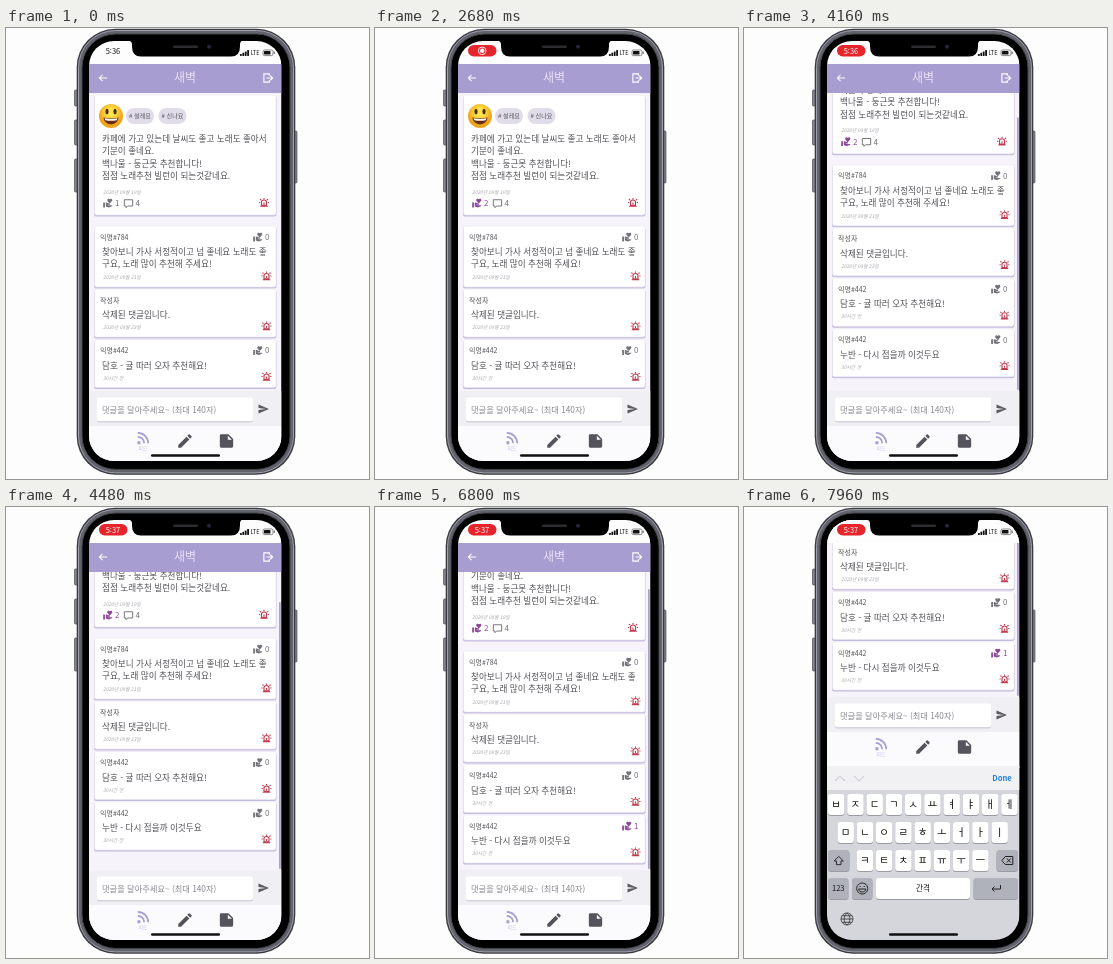
Recreate the animation shown at these times as an HTML page. Size 363 by 451 pixels, loop 8 s.

```html
<!DOCTYPE html>
<html lang="ko">
<head>
<meta charset="utf-8">
<title>Comment screen</title>
<style>
  html, body { margin: 0; width: 100%; height: 100%; overflow: hidden; background: #fdfdfd; }
  svg { display: block; width: 363px; height: 451px; }
  text { font-family: "Noto Sans CJK KR", "Noto Sans CJK", "Noto Sans", sans-serif; }
</style>
</head>
<body>
<svg id="stage" viewBox="0 0 363 451"></svg>
<script>
const INK = '#525157', PALE = '#a5a3aa', MUTED = '#737179', LIKED = '#8c479a', RED = '#bd3c50',
  VIOLET = '#a79dd0', LILAC = '#e9e0f6', SHADOW = '#c5bcdd';

const ICONS = {
  care: 'M1 11h4v11H1zM16 3.25C16.65 2.49 17.66 2 18.7 2 20.55 2 22 3.45 22 5.3c0 2.27-2.91 4.9-6 7.7-3.09-2.81-6-5.44-6-7.7C10 3.45 11.45 2 13.3 2c1.04 0 2.05.49 2.7 1.25zM20 17h-7l-2.09-.73.33-.94L13 16h2.82c.65 0 1.18-.53 1.18-1.18 0-.49-.31-.93-.77-1.11L8.97 11H7v9.02L14 22l8.01-3c-.01-1.1-.9-2-2.01-2z',
  siren: 'M3 21h18M6 19v-8a6 5 0 0 1 12 0v8zM12 12v5M12 1v3M2 4l3 2M22 4l-3 2M0 12h3M21 12h3',
  bubble: 'M2 3h20v15H10l-4 4v-4H2z',
  back: 'M21 12H4M11 5l-7 7 7 7',
  exit: 'M15 7V3H3v18h12v-4M9 12h13M17 7l5 5-5 5',
  send: 'M2 21 23 12 2 3v7l15 2-15 2z',
  rss: 'M3 3a18 18 0 0 1 18 18M3 10a11 11 0 0 1 11 11M4 19h2v2H4z',
  pencil: 'M3 17.25V21h3.75L17.81 9.94l-3.75-3.75zM20.71 7.04a1 1 0 0 0 0-1.41l-2.34-2.34a1 1 0 0 0-1.41 0l-1.83 1.83 3.75 3.75z',
  note: 'M4 2h11l7 7v11a2 2 0 0 1-2 2H4a2 2 0 0 1-2-2V4a2 2 0 0 1 2-2zM14 4v6h6z',
  shift: 'M12 3 2 13h5v8h10v-8h5z',
  erase: 'M8 4h15v16H8l-7-8zM11 8l8 8M19 8l-8 8',
  enter: 'M21 5v8H4M9 8l-5 5 5 5',
  globe: 'M12 1a11 11 0 1 0 .01 0M12 1c-7 6-7 16 0 22M12 1c7 6 7 16 0 22M1 12h22M3 6h18M3 18h18',
  smile: 'M12 1a11 11 0 1 0 .01 0M5 13h14c0 8-14 8-14 0M8 7v2M16 7v2'
};

const rect = (x, y, w, h, fill, r = 0, more = '') =>
  `<rect x="${x}" y="${y}" width="${w}" height="${h}" rx="${r}" fill="${fill}" ${more}/>`;

// y is the vertical middle of the line
const text = (x, y, str, size, fill = INK, more = '') =>
  `<text x="${x}" y="${y + size * 0.36}" font-size="${size}" fill="${fill}" ${more}>${str}</text>`;

const mid = 'text-anchor="middle"';

// Icons are centred on x, y; a line width turns them into outlines
const icon = (name, x, y, size, color, line = 0) =>
  `<path d="${ICONS[name]}" transform="translate(${x - size / 2} ${y - size / 2}) scale(${size / 24})" ` +
  (line ? `fill="none" stroke="${color}" stroke-width="${line}"` : `fill="${color}" fill-rule="evenodd"`) + '/>';

const siren = (x, y) => icon('siren', x, y, 10, RED, 2.7);

const likes = (id, x, y, numX) =>
  `<g id="${id}" fill="${MUTED}">${icon('care', x, y, 10.5, 'currentFill').replace('fill="currentFill"', '')}` +
  text(numX, y, '0', 8, MUTED) + '</g>';

const card = (y, h) =>
  rect(88, y + 1.5, 182.5, h, SHADOW, 2) + rect(88.5, y, 181.5, h, '#fff', 2, 'stroke="#e8e4f1" stroke-width=".6"');

const date = (y, str) => text(97, y, str, 4.85, PALE, 'font-style="italic"');

function comment(y, h, author, lines, written, id) {
  const end = y + h;
  return card(y, h) +
    text(94, y + 11, author, 7) +
    lines.map((line, i) => text(96, y + 26 + i * 12.4, line, 8.6)).join('') +
    date(end - 9.5, written) +
    siren(260.5, end - 11) +
    (id ? likes(id, 252, y + 11, 259) : '');
}

function post() {
  const lines = ['카페에 가고 있는데 날씨도 좋고 노래도 좋아서', '기분이 좋네요.',
    '백나울 - 둥근못 추천합니다!', '점점 노래추천 빌런이 되는것같네요.'];
  const chip = (x, label) => rect(x, 80, 28, 16, '#e0dcea', 8) + text(x + 14, 88, label, 6.1, INK, mid);
  const eye = x => `<ellipse cx="${x}" cy="83.5" rx="1.6" ry="2.7" fill="#4a2b0c"/>`;
  return card(67, 120) +
    '<circle cx="105" cy="88" r="12" fill="url(#sun)"/>' + eye(101) + eye(109) +
    '<path d="M97.5 89.5q7.5 2 15 0c-.5 9-14.5 9-15 0z" fill="#6b2a12"/><path d="M98.5 90.2q6.5 1.5 13 0l-.8 2q-5.7 1-11.4 0z" fill="#fff"/>' +
    chip(120, '# 설레요') + chip(152.5, '# 신나요') +
    lines.map((line, i) => text(96, 111 + i * 12.3, line, 8.6)).join('') +
    date(164, '2020년 09월 19일') +
    likes('postLikes', 102, 175, 109) +
    icon('bubble', 122.5, 175.5, 10, MUTED, 2.3) + text(129.5, 175, '4', 8, MUTED) +
    siren(258, 174.5);
}

function page() {
  return rect(83, 36, 192.5, 398, '#f6f4fa') +
    `<g clip-path="url(#view)"><g id="list">${post()}` +
    comment(198, 61, '익명#784', ['찾아보니 가사 서정적이고 넘 좋네요 노래도 좋', '구요, 노래 많이 추천해 주세요!'], '2020년 09월 21일', 'likesA') +
    comment(261, 48, '작성자', ['삭제된 댓글입니다.'], '2020년 09월 23일') +
    comment(311.5, 48, '익명#442', ['담호 - 귤 따러 오자 추천해요!'], '30시간 전', 'likesB') +
    comment(362, 48, '익명#442', ['누반 - 다시 접을까 이것두요'], '30시간 전', 'likesC') +
    `</g>${rect(273, 82, 1.8, 270, '#aaa3c4', 0.9, 'id="bar"')}</g>` +
    rect(83, 363, 192.5, 35, '#f0eff3') + rect(91, 371, 156, 23.5, '#d6d2e0', 2) + rect(91, 369.5, 156, 23.5, '#fff', 2) +
    text(96, 382, '댓글을 달아주세요~ (최대 140자)', 8.25, '#89878f') +
    icon('send', 257.5, 381, 12, '#5c5a63') +
    rect(83, 398, 192.5, 36, '#fbfafd') +
    icon('rss', 137, 410, 14, VIOLET, 3) + text(137, 420.5, '피드', 4.8, '#c9bbe4', mid) +
    icon('pencil', 179, 413, 18, '#55535c') + icon('note', 220.5, 413, 16, '#55535c') +
    rect(83, 36, 192.5, 29, VIOLET) +
    icon('back', 97, 50, 11, '#fff', 2.2) + text(179, 50, '새벽', 12, LILAC, mid) + icon('exit', 262, 50, 11, '#fff', 2.5);
}

function keyboard() {
  const grey = '#b0b2bb', dark = '#222';
  const key = (x, y, w, label, size = 9, fill = '#fff') =>
    rect(x, y + 1, w, 21, '#9b9ca3', 3) + rect(x, y, w, 21, fill, 3) + text(x + w / 2, y + 10.5, label, size, '#111', mid);
  const row = (letters, x, y) => [...letters].map((c, i) => key(x + i * 19.25, y, 16.4, c, 10.5)).join('');
  return rect(83, 259, 192.5, 175, '#d5d6dc') + rect(83, 259, 192.5, 24, '#f1f1f4') +
    '<path d="M91 274l5-5 5 5M110 269l5 5 5-5" fill="none" stroke="#cfcfd6" stroke-width="1.2"/>' +
    text(258, 271, 'Done', 7.6, '#1f80dc', mid + ' font-weight="700"') +
    row('ㅂㅈㄷㄱㅅㅛㅕㅑㅐㅔ', 84, 287) + row('ㅁㄴㅇㄹㅎㅗㅓㅏㅣ', 93.5, 315) + row('ㅋㅌㅊㅍㅠㅜㅡ', 112.7, 343) +
    key(84, 343, 21.5, '', 9, grey) + icon('shift', 94.7, 353.5, 11, dark, 2) +
    key(252.5, 343, 21.5, '', 9, grey) + icon('erase', 263.3, 353.5, 12, dark, 2) +
    key(84, 371, 20.5, '123', 7.5, grey) + key(108, 371, 20.5, '', 9, grey) + icon('smile', 118.2, 381.5, 12, dark, 2) +
    key(132, 371, 94, '간격', 7.5) + key(229.5, 371, 44.5, '', 9, grey) + icon('enter', 252, 381.5, 12, dark, 2) +
    icon('globe', 103, 412, 13, '#444', 1.8);
}

function statusBar() {
  const bars = [0, 1, 2, 3].map(i => rect(234 + i * 2.4, 26 - i * 1.3, 1.8, 2 + i * 1.3, '#111', 0.4)).join('');
  return rect(83, 13, 192.5, 23, '#fdfdfd') +
    rect(93, 17, 28.5, 11.5, '#e5242c', 5.75, 'id="pill"') +
    '<g id="record"><circle cx="107.2" cy="22.8" r="3.8" fill="none" stroke="#fff" stroke-width=".9"/><circle cx="107.2" cy="22.8" r="2.2" fill="#fff"/></g>' +
    text(107, 23, '', 7.5, '#111', mid + ' id="clock" font-weight="500"') +
    bars + text(244.5, 25, 'LTE', 5.6, '#111', 'font-weight="500"') +
    rect(257, 22, 10, 5.6, 'none', 1.5, 'stroke="#555" stroke-width=".7"') + rect(258, 23, 6.5, 3.6, '#111', 0.7) + rect(267.7, 23.7, 1, 2.2, '#555');
}

function phone() {
  const button = (x, y, h) => rect(x, y, 3, h, '#85868f', 1, 'stroke="#3c3d43" stroke-width=".6"');
  return button(68.5, 62, 16) + button(68.5, 92, 25) + button(68.5, 131, 33) + button(288, 103, 52) +
    rect(70.7, 0.7, 218.6, 446, '#3a3b41', 38.5) +
    rect(72.5, 2.5, 215, 442.4, '#62636c', 37, 'stroke="#a0a1aa" stroke-width="1"') +
    rect(76, 6, 208, 435.4, '#000', 33.5, 'stroke="#45464d" stroke-width="1"');
}

document.getElementById('stage').innerHTML =
  `<defs>
    <clipPath id="screen">${rect(83, 13, 192.5, 420, '#000', 25)}</clipPath>
    <clipPath id="view">${rect(83, 65, 192.5, 298, '#000')}</clipPath>
    <radialGradient id="sun" cy=".35"><stop offset=".3" stop-color="#ffe34a"/><stop offset="1" stop-color="#eda51c"/></radialGradient>
  </defs>` + phone() +
  `<g clip-path="url(#screen)"><g id="page">${page()}</g><g id="keys">${keyboard()}</g>${statusBar()}</g>` +
  '<path d="M121 12.5h117q-4 0-4 4v2q0 10-9 10h-90q-9 0-9-10v-2q0-4-5-4z" fill="#000"/>' +
  rect(167, 17.5, 25, 2.5, '#2c2c31', 1.2) + '<circle cx="203" cy="18.8" r="2" fill="#25263a"/>' +
  rect(145, 426.3, 69, 2.4, '#111', 1.2);

const $ = id => document.getElementById(id);
const show = (el, on) => el.setAttribute('visibility', on ? 'visible' : 'hidden');
const move = (el, y) => el.setAttribute('transform', `translate(0 ${y})`);

// Smoothly eased value between [time, value] stops
function track(t, stops) {
  const next = stops.findIndex(([time]) => t < time);
  if (next === 0) return stops[0][1];
  if (next < 0) return stops[stops.length - 1][1];
  const [t0, v0] = stops[next - 1], [t1, v1] = stops[next];
  const p = (t - t0) / (t1 - t0);
  return v0 + (v1 - v0) * p * p * (3 - 2 * p);
}

function setLikes(id, count, liked) {
  const color = liked ? LIKED : MUTED;
  $(id).setAttribute('fill', color);
  $(id).lastChild.setAttribute('fill', color);
  $(id).lastChild.textContent = count;
}

const SCROLL = [[3420, 0], [3900, 57], [4480, 67], [5160, 54]];
const KEYBOARD = [[7040, 0], [7440, 1]];

function draw(t) {
  const scroll = track(t, SCROLL), lift = track(t, KEYBOARD);
  move($('list'), -scroll);
  move($('page'), -173 * lift);
  move($('keys'), 174 * (1 - lift));

  const barTop = scroll < 54 ? 66 + scroll * 0.3 : 82 + scroll - 54;
  $('bar').setAttribute('y', barTop);
  $('bar').setAttribute('height', Math.min(280, 362 - barTop));
  show($('bar'), t >= SCROLL[0][0]);

  const postLiked = t >= 1300, commentLiked = t >= 6320;
  setLikes('postLikes', postLiked ? 2 : 1, postLiked);
  setLikes('likesC', commentLiked ? 1 : 0, commentLiked);

  const recording = t >= 400, dot = recording && t < 3300;
  show($('pill'), recording);
  show($('record'), dot);
  show($('clock'), !dot);
  $('clock').textContent = t < 4200 ? '5:36' : '5:37';
  $('clock').setAttribute('fill', recording ? '#fff' : '#111');
}

const start = performance.now();
function tick() {
  draw((performance.now() - start) % 8000);
  requestAnimationFrame(tick);
}
tick();
</script>
</body>
</html>
```
